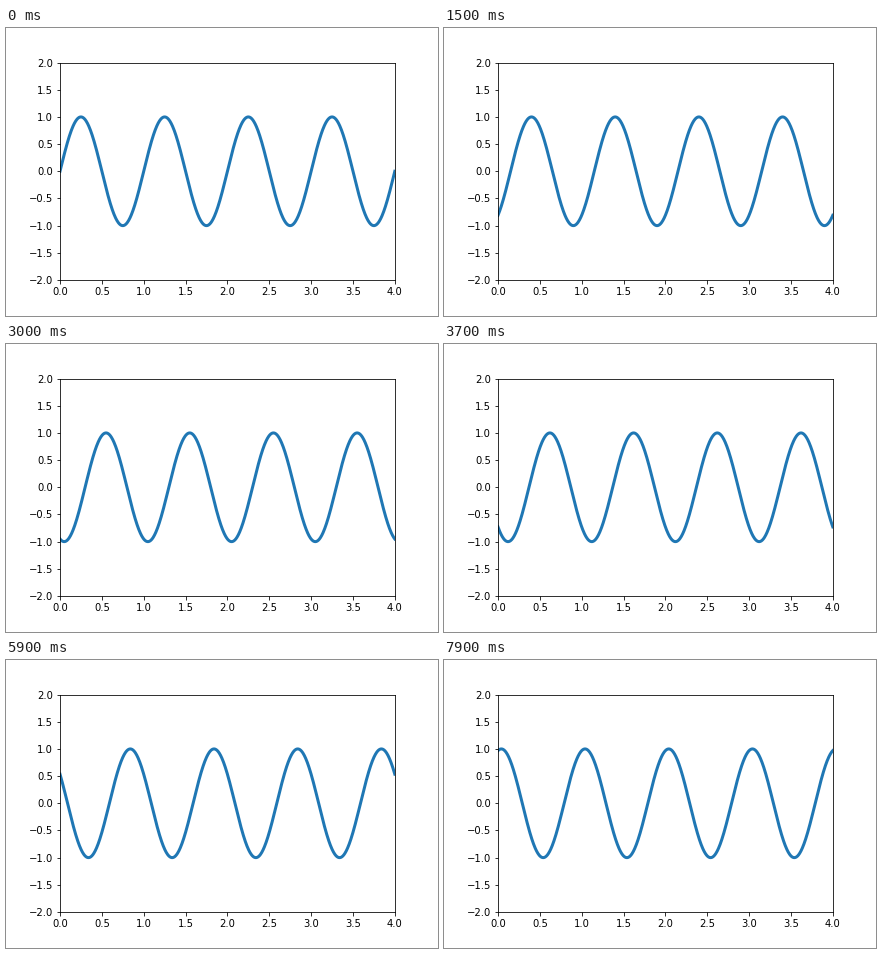
Animation, 432 px wide and 288 px high, one loop 8000 ms. Source, as a matplotlib script:

```python
import numpy as np
import matplotlib.pyplot as plt
from matplotlib.animation import FuncAnimation

FRAMES = 80
INTERVAL = 100  # ms
SHIFT = 0.01    # wave travel per frame, in x units

fig = plt.figure(figsize=(6, 4), dpi=72)
fig.subplots_adjust(bottom=0.125)
ax = fig.add_subplot(xlim=(0, 4), ylim=(-2, 2))
line, = ax.plot([], [], lw=3)
x = np.linspace(0, 4, 1000)


def init():
    line.set_data([], [])
    return line,


def animate(i):
    line.set_data(x, np.sin(2 * np.pi * (x - SHIFT * i)))
    return line,


anim = FuncAnimation(fig, animate, init_func=init, frames=FRAMES,
                     interval=INTERVAL, repeat=True, repeat_delay=0, blit=True)

plt.show()
```
